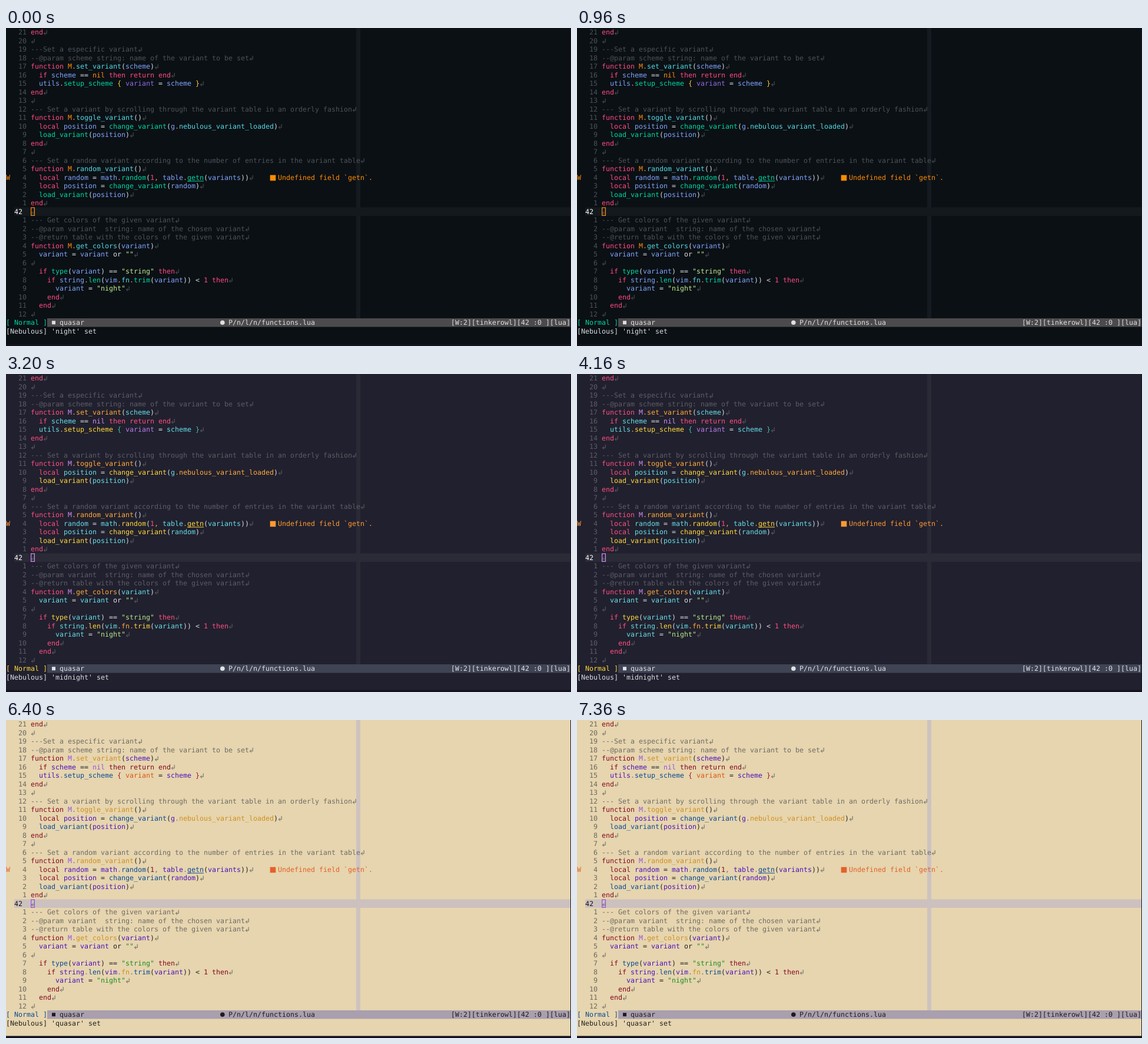
These frames come from a looping animation (960 px wide and 540 px high, 8 s). An HTML page with a canvas:

```html
<!DOCTYPE html>
<html lang="en">
<head>
<meta charset="utf-8">
<title>Editor colour variants</title>
<style>
html, body { margin: 0; width: 100%; height: 100%; overflow: hidden; background: #15121f; }
canvas { display: block; width: 960px; height: 540px; }
</style>
</head>
<body>
<canvas id="stage" width="960" height="540"></canvas>
<script>
const ctx = document.getElementById('stage').getContext('2d');
const CELL = 7, ROW = 14.5, BASE = 11.4, EDGE = 959;
const HOLD = 1600, CURSOR_ROW = 21, STATUS_ROW = 34;
const FONT = '11.63px "DejaVu Sans Mono", "Noto Sans Mono", monospace';

// Keys: k keyword/number, m constant, p delimiter, f field, c call, v variable,
// t table key, b brace, s string, w plain, r comment, n line number
const themes = [
  { name: 'night', bg: '#0b1015', line: '#14191e', column: '#141a20', bar: '#4c4a4c', barText: '#dfdfdc',
    k: '#ff4a80', m: '#ff8c0a', p: '#ff9a1f', f: '#55d8e2', c: '#00d6a0', v: '#80a4fa', t: '#8f6ae0',
    b: '#ffcc33', s: '#c0ec90', w: '#d8dce0', r: '#4c5257', n: '#4c5257', warn: '#ff8c00', now: '#ffffff' },
  { name: 'twilight', bg: '#000015', line: '#0f0f23', column: '#100f23', bar: '#3a3f4c', barText: '#e0e2e8',
    k: '#fa4f8a', m: '#50c8f0', p: '#ffa040', f: '#ff9f3a', c: '#fff04c', v: '#2fc8a8', t: '#c678f0',
    b: '#ffc233', s: '#98ea80', w: '#dcdde4', r: '#54545c', n: '#54545c', warn: '#ffa23d', now: '#ffffff' },
  { name: 'midnight', bg: '#21202e', line: '#2b2a37', column: '#2a2936', bar: '#3f4454', barText: '#e0e2e8',
    k: '#ff4f80', m: '#d08cf5', p: '#ff9e3b', f: '#ffaa3c', c: '#ffd93d', v: '#65dfe6', t: '#b57be8',
    b: '#35c5b0', s: '#b8ea88', w: '#dcdde2', r: '#5d5c66', n: '#5d5c66', warn: '#ff9a33', now: '#ffffff' },
  { name: 'fullmoon', bg: '#2c2f37', line: '#343740', column: '#33363f', bar: '#414759', barText: '#dcdfe6',
    k: '#e86a76', m: '#e5923f', p: '#e59a45', f: '#f0aa38', c: '#dcaa65', v: '#8cc8c4', t: '#b47fdc',
    b: '#4fb3a2', s: '#9aca7c', w: '#d5d8dd', r: '#60636a', n: '#656870', warn: '#f5933a', now: '#ffffff' },
  { name: 'quasar', bg: '#e6d5ae', line: '#ccc1bf', column: '#cdc3c0', bar: '#a99fae', barText: '#1e1c20',
    k: '#86081f', m: '#9a52dc', p: '#6a7488', f: '#d18f22', c: '#0b4a94', v: '#4f12bd', t: '#dd5512',
    b: '#a3152c', s: '#1d8c22', w: '#222222', r: '#706c66', n: '#6b6863', warn: '#e5602a', now: '#111111' }
];

// Every token starts with ~ and its colour key
const code = [
  '~kend', '',
  '~r---Set a especific variant',
  '~r--@param scheme string: name of the variant to be set',
  '~kfunction ~mM~p.~fset_variant~w(~vscheme~w)',
  '~k  if ~vscheme ~w== ~mnil ~kthen return end',
  '~v  utils~p.~csetup_scheme ~b{ ~tvariant ~w= ~vscheme ~b}',
  '~kend', '',
  '~r--- Set a variant by scrolling through the variant table in an orderly fashion',
  '~kfunction ~mM~p.~ftoggle_variant~w()',
  '~k  local ~vposition ~w= ~cchange_variant~w(~vg~p.~fnebulous_variant_loaded~w)',
  '~c  load_variant~w(~vposition~w)',
  '~kend', '',
  '~r--- Set a random variant according to the number of entries in the variant table',
  '~kfunction ~mM~p.~frandom_variant~w()',
  '~k  local ~vrandom ~w= ~vmath~p.~crandom~w(~k1~p, ~vtable~p.~cgetn~w(~vvariants~w))',
  '~k  local ~vposition ~w= ~cchange_variant~w(~vrandom~w)',
  '~c  load_variant~w(~vposition~w)',
  '~kend', '',
  '~r--- Get colors of the given variant',
  '~r--@param variant  string: name of the chosen variant',
  '~r--@return table with the colors of the given variant',
  '~kfunction ~mM~p.~fget_colors~w(~vvariant~w)',
  '~v  variant ~w= ~vvariant ~wor ~s""',
  '',
  '~k  if ~ctype~w(~vvariant~w) == ~s"string" ~kthen',
  '~k    if ~vstring~p.~clen~w(~vvim~p.~ffn~p.~ctrim~w(~vvariant~w)) < ~k1 ~kthen',
  '~v      variant ~w= ~s"night"',
  '~k    end',
  '~k  end', ''
].map(s => s.split('~').slice(1).map(t => [t[0], t.slice(1)]));

function box(color, x, y, w, h) {
  ctx.fillStyle = color;
  ctx.fillRect(x, y, w, h);
}

function text(str, col, row, color) {
  ctx.fillStyle = color;
  ctx.fillText(str, col * CELL, row * ROW + BASE);
}

function lineEnd(col, row, color) {
  const x = col * CELL, y = row * ROW + BASE;
  ctx.strokeStyle = color;
  ctx.lineWidth = 1;
  ctx.beginPath();
  ctx.moveTo(x + 6.2, y - 7.8);
  ctx.lineTo(x + 6.2, y - 2);
  ctx.lineTo(x + 1.4, y - 2);
  ctx.moveTo(x + 3.9, y - 4.5);
  ctx.lineTo(x + 1.4, y - 2);
  ctx.lineTo(x + 3.9, y + 0.5);
  ctx.stroke();
}

function drawCode(th) {
  code.forEach((tokens, row) => {
    const current = row === CURSOR_ROW;
    const label = String(current ? 42 : Math.abs(row - CURSOR_ROW));
    text(label, (current ? 4 : 5) - label.length, row, current ? th.now : th.n);
    let col = 6;
    for (const [key, str] of tokens) {
      text(str, col, row, th[key]);
      if (str === 'getn') box(th.c, col * CELL, row * ROW + BASE + 1.6, 28, 1);
      col += str.length;
    }
    lineEnd(col, row, th.n);
  });
}

function drawStatus(th) {
  const top = STATUS_ROW * ROW, mid = top + ROW / 2;
  box(th.bar, 70, top, EDGE - 70, ROW);
  text('[ Normal ]', 0, STATUS_ROW, th.c);
  box(th.barText, 78, mid - 3, 6, 6);
  text('quasar', 13, STATUS_ROW, th.barText);
  ctx.beginPath();
  ctx.arc(367.8, mid, 3.8, 0, Math.PI * 2);
  ctx.fill();
  text('P/n/l/n/functions.lua', 54, STATUS_ROW, th.barText);
  text('[W:2][tinkerowl][42 :0 ][lua]', 108, STATUS_ROW, th.barText);
  text(`[Nebulous] '${th.name}' set`, 0, STATUS_ROW + 1, th.w);
}

function draw(th) {
  const cursorTop = CURSOR_ROW * ROW;
  box('#15121f', 0, 0, 960, 540);
  box(th.bg, 0, 0, EDGE, 37 * ROW);
  box(th.column, 595, 0, CELL, STATUS_ROW * ROW);
  box(th.line, 14, cursorTop, EDGE - 14, ROW);
  ctx.font = FONT;
  ctx.textBaseline = 'alphabetic';
  ctx.textRendering = 'geometricPrecision';
  ctx.fontKerning = 'none';
  drawCode(th);
  text('W', 0, 17, th.warn);
  box(th.warn, 448.7, 249.7, 9.6, 9.6);
  text('Undefined field `getn`.', 66, 17, th.warn);
  ctx.strokeStyle = th.m;
  ctx.lineWidth = 1.2;
  ctx.strokeRect(42.6, cursorTop + 0.6, CELL - 1.2, ROW - 1.2);
  drawStatus(th);
}

function tick() {
  draw(themes[Math.floor(performance.now() / HOLD) % themes.length]);
  requestAnimationFrame(tick);
}
tick();
</script>
</body>
</html>
```
